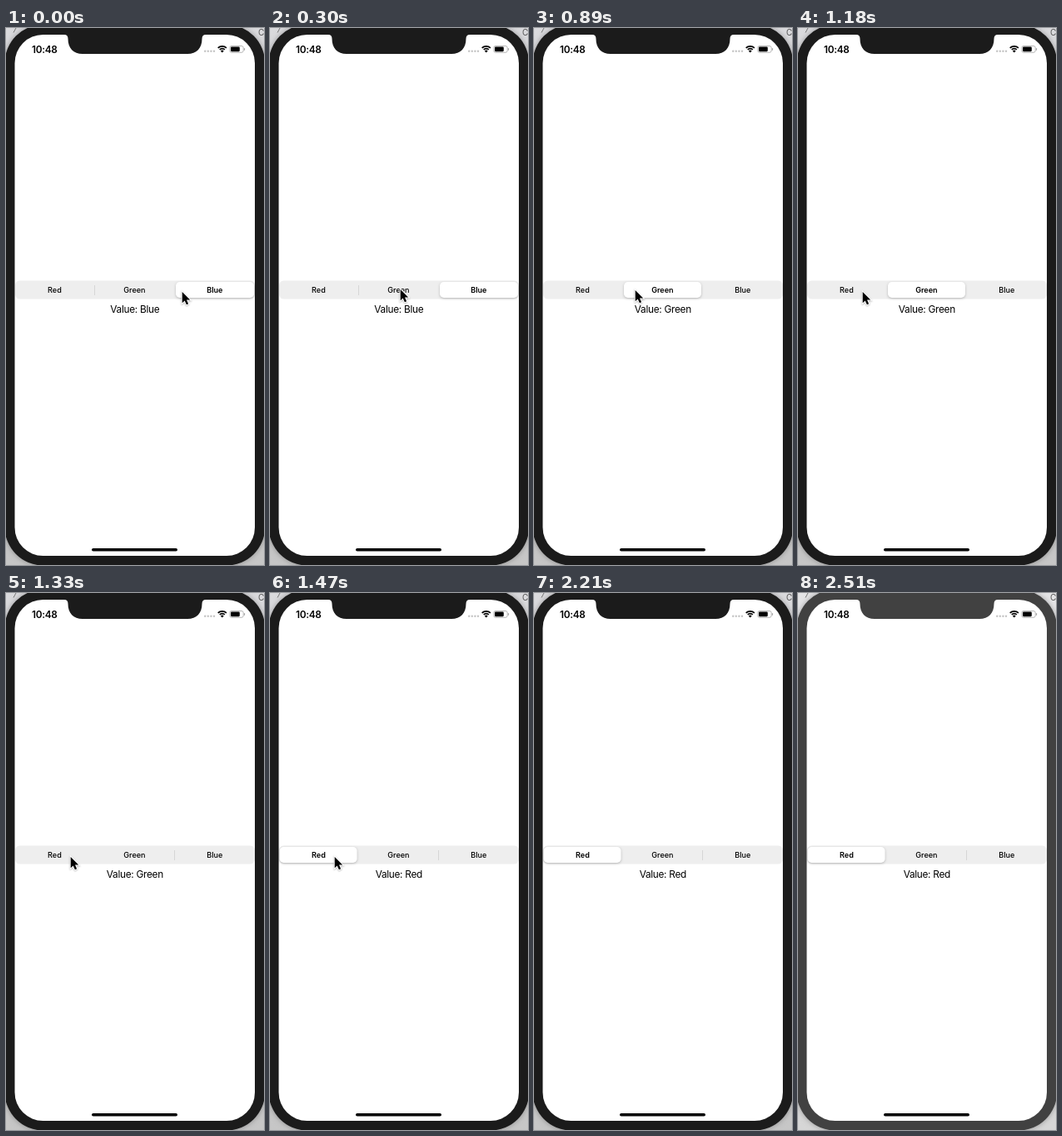
An HTML page with a canvas that plays this animation: 310x643 px, repeating every 2.61 s.

```html
<!DOCTYPE html>
<html lang="en">
<head>
<meta charset="utf-8">
<title>Segmented control</title>
<style>
html, body { margin: 0; width: 100%; height: 100%; overflow: hidden; background: #d4d4d6; }
canvas { display: block; width: 310px; height: 643px; }
</style>
</head>
<body>
<canvas id="stage"></canvas>
<script>
const W = 310, H = 643, LOOP = 2610;
const canvas = document.getElementById('stage');
const c = canvas.getContext('2d');
const ratio = window.devicePixelRatio || 1;
canvas.width = W * ratio;
canvas.height = H * ratio;

const NAMES = ['Red', 'Green', 'Blue'];
const CENTERS = [58.4, 154.4, 250.8];
const THUMBS = [[11.6, 93], [108, 93], [204, 94]];

// Pointer positions: [start time, x, y]; no position means hidden
const POINTER = [
  [0, 210, 314], [150, 162, 314], [300, 155, 311], [890, 120, 312],
  [1040, 93, 313], [1180, 76, 314], [1770, 181, 497], [1920, 248, 604],
  [2070, 262, 626], [2210]
];
// Selection: [start time, segment in use, thumb presence, label value]
const SELECTION = [
  [0, 2, 1, 2], [450, 1, 0.8, 2], [590, 1, 1, 1],
  [1330, 0, 0, 1], [1470, 0, 1, 0]
];

const at = (track, t) => track.filter(k => k[0] <= t).pop();

function box(x, y, w, h, r, fill) {
  c.beginPath();
  c.roundRect(x, y, w, h, r);
  c.fillStyle = fill;
  c.fill();
}

function text(str, x, y, size, weight, align = 'center', spacing = 0, color = '#000') {
  c.font = `${weight} ${size}px Inter, Roboto, sans-serif`;
  c.letterSpacing = spacing + 'px';
  c.textAlign = align;
  c.fillStyle = color;
  c.fillText(str, x, y);
}

function drawDesktop(faded) {
  const g = c.createLinearGradient(0, 0, 0, H);
  g.addColorStop(0, faded ? '#e4e4e6' : '#dadadd');
  g.addColorStop(1, faded ? '#d6d6d6' : '#c6c6c6');
  c.fillStyle = g;
  c.fillRect(0, 0, W, H);
  text('C', 303, 9.3, 10, 400, 'left', 0, '#555');
  c.beginPath();
  c.moveTo(9, 5.5);
  c.lineTo(12, 0);
  c.strokeStyle = '#777';
  c.lineWidth = 1;
  c.stroke();
}

function drawPhone(faded) {
  const shell = faded ? '#414141' : '#1b1b1b';
  c.save();
  c.shadowColor = 'rgba(0,0,0,0.3)';
  c.shadowBlur = 6 * ratio;
  box(-1.5, -4, 312.7, 647.5, 46, shell);
  c.restore();
  box(10.5, 8, 288.5, 624, 34, '#fff');

  // Notch with flared top corners
  c.beginPath();
  c.moveTo(69, 7);
  c.lineTo(70, 8);
  c.quadraticCurveTo(74.5, 8, 74.5, 13);
  c.bezierCurveTo(74.5, 24, 81, 31, 92, 31);
  c.lineTo(218, 31);
  c.bezierCurveTo(229, 31, 235.5, 24, 235.5, 13);
  c.quadraticCurveTo(235.5, 8, 240, 8);
  c.lineTo(241, 7);
  c.fillStyle = shell;
  c.fill();
  box(103, 623, 103, 3.6, 1.8, '#000');
}

function drawStatus() {
  text('10:48', 31, 29.5, 11.8, 600, 'left', -0.3);
  for (let i = 0; i < 4; i++) box(238 + i * 3.6, 26.6, 2.4, 2.4, 1.2, '#c4c4c4');

  c.strokeStyle = '#000';
  c.lineWidth = 1.7;
  for (const r of [4.3, 7.2]) {
    c.beginPath();
    c.arc(259.8, 29, r, -Math.PI * 0.75, -Math.PI * 0.25);
    c.stroke();
  }
  c.beginPath();
  c.moveTo(259.8, 29.4);
  c.arc(259.8, 29.4, 2.7, -Math.PI * 0.75, -Math.PI * 0.25);
  c.fillStyle = '#000';
  c.fill();

  c.beginPath();
  c.roundRect(268.8, 21.5, 16.4, 7.8, 2.2);
  c.strokeStyle = '#a5a5a5';
  c.lineWidth = 0.8;
  c.stroke();
  box(270, 22.6, 10.8, 5.6, 1.1, '#000');
  box(286, 24, 1.1, 2.8, 0.6, '#a5a5a5');
}

function drawControl([, active, presence, value]) {
  box(11, 302.5, 288, 22, 5.5, '#eeeeee');
  c.fillStyle = '#d6d6d6';
  if (active === 2) c.fillRect(106, 308, 1, 12);
  if (active === 0) c.fillRect(202, 308, 1, 12);

  if (presence) {
    const [x, w] = THUMBS[active];
    const inset = (1 - presence) * 5;
    c.save();
    c.globalAlpha = presence;
    c.shadowColor = 'rgba(0,0,0,0.24)';
    c.shadowBlur = 3 * ratio;
    c.shadowOffsetY = ratio;
    box(x + inset, 304 + inset / 5, w - 2 * inset, 19 - inset / 2.5, 4.8, '#fff');
    c.restore();
  }
  NAMES.forEach((name, i) => {
    text(name, CENTERS[i], 316.8, 9.05, presence && i === active ? 600 : 500);
  });
  text('Value: ' + NAMES[value], 154.8, 341.3, 11.85, 400, 'center', -0.3);
}

function drawPointer(x, y) {
  c.save();
  c.translate(x + 1.7, y + 2);
  c.beginPath();
  c.moveTo(0, 0);
  c.lineTo(0, 13.2);
  c.lineTo(3, 10.4);
  c.lineTo(5.2, 15.2);
  c.lineTo(7.4, 14.2);
  c.lineTo(5.3, 9.6);
  c.lineTo(9.5, 9.6);
  c.closePath();
  c.save();
  c.shadowColor = 'rgba(0,0,0,0.3)';
  c.shadowBlur = 2 * ratio;
  c.shadowOffsetY = 0.8 * ratio;
  c.strokeStyle = '#fff';
  c.lineWidth = 2;
  c.stroke();
  c.restore();
  c.fillStyle = '#000';
  c.fill();
  c.restore();
}

function draw(t) {
  const faded = t >= 2510;
  c.setTransform(ratio, 0, 0, ratio, 0, 0);
  drawDesktop(faded);
  drawPhone(faded);
  drawStatus();
  drawControl(at(SELECTION, t));
  const [, x, y] = at(POINTER, t);
  if (x !== undefined) drawPointer(x, y);
}

const start = performance.now();
function tick() {
  draw((performance.now() - start) % LOOP);
  requestAnimationFrame(tick);
}
tick();
</script>
</body>
</html>
```
